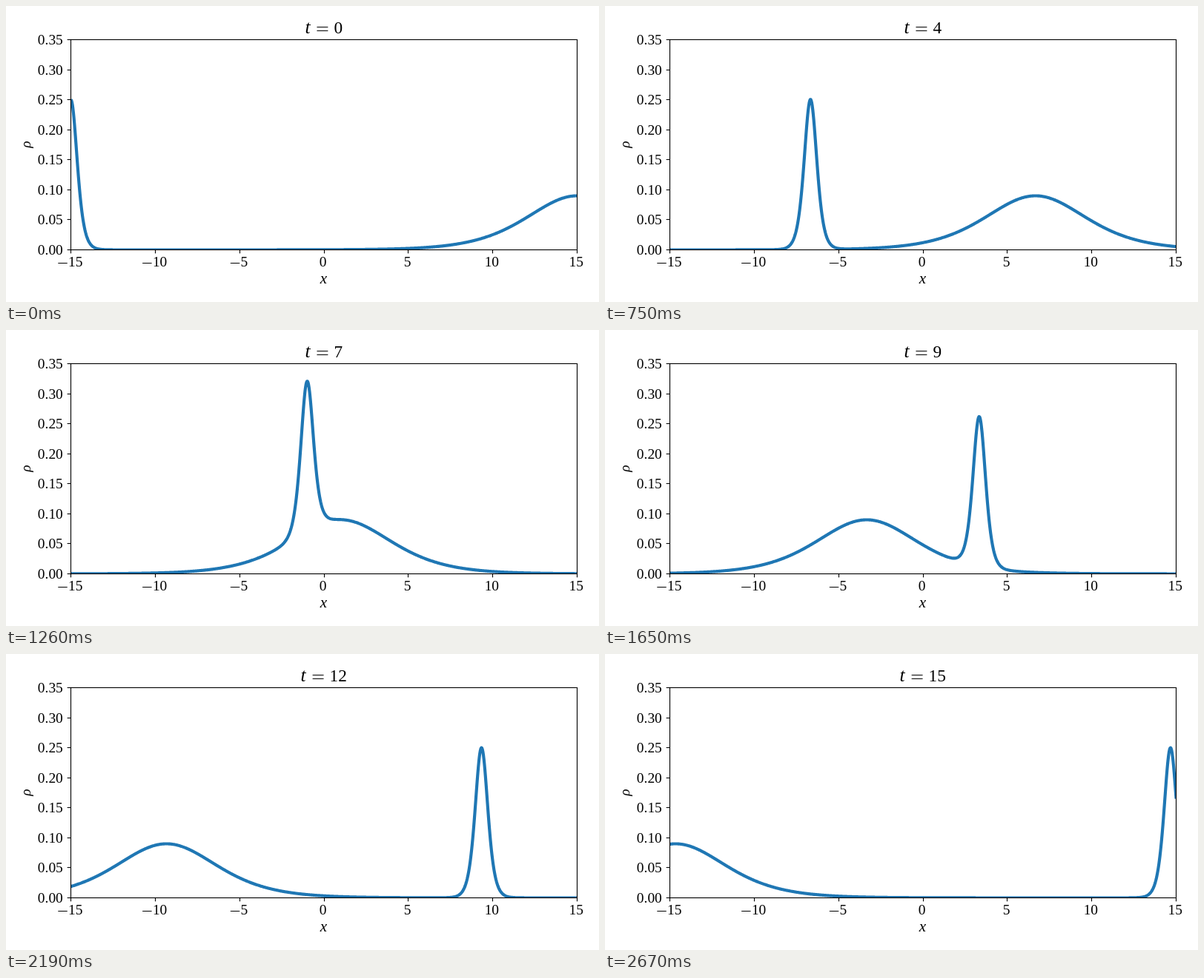
An HTML page with a canvas for the animation above (2700 ms loop, 800 by 400 pixels).

```html
<!DOCTYPE html>
<html lang="en">
<head>
<meta charset="utf-8">
<title>Two crossing pulses</title>
<style>
  html, body { margin: 0; width: 100%; height: 100%; overflow: hidden; background: #fff; }
  canvas { display: block; }
</style>
</head>
<body>
<canvas id="stage" width="800" height="400"></canvas>
<script>
const ctx = document.getElementById('stage').getContext('2d');
const SERIF = '"Liberation Serif", "Times New Roman", serif';
const STEP_MS = 30, STEPS = 90;
const LABEL = 19.4, TITLE = 23.3;
const box = { left: 87.5, right: 770.5, top: 45.5, bottom: 329.5 };
const xMin = -15, xMax = 15, yMax = 0.35;

const toX = x => box.left + (x - xMin) / (xMax - xMin) * (box.right - box.left);
const toY = y => box.bottom - y / yMax * (box.bottom - box.top);
const snap = v => Math.floor(v) + 0.5;
const pulse = (height, rate, d) => height / Math.cosh(rate * d) ** 2;

function roundHalfEven(v) {
  const low = Math.floor(v);
  return v - low === 0.5 ? low + low % 2 : Math.round(v);
}

function write(text, x, y, size, align = 'left', style = '') {
  ctx.font = `${style} ${size}px ${SERIF}`;
  ctx.textAlign = align;
  ctx.fillText(text, x, y);
}

function segment(x1, y1, x2, y2) {
  ctx.beginPath();
  ctx.moveTo(x1, y1);
  ctx.lineTo(x2, y2);
  ctx.stroke();
}

// Wide, thin bar used for the minus and equals signs.
function bar(x, y, size) {
  ctx.fillRect(x + 0.07 * size, y - 0.5, 0.64 * size, 1);
}

function drawCurve(shift) {
  ctx.save();
  ctx.beginPath();
  ctx.rect(box.left, box.top, box.right - box.left, box.bottom - box.top);
  ctx.clip();
  ctx.beginPath();
  const samples = 1000;
  for (let i = 0; i < samples; i++) {
    const x = xMin + (xMax - xMin) * i / (samples - 1);
    const rho = pulse(0.25, 2, x - xMin - shift) + pulse(0.09, 0.25, x - xMax + shift);
    ctx.lineTo(toX(x), toY(rho));
  }
  ctx.strokeStyle = '#1f77b4';
  ctx.lineWidth = 4.17;
  ctx.lineJoin = 'round';
  ctx.stroke();
  ctx.restore();
}

function drawAxes() {
  ctx.strokeStyle = ctx.fillStyle = '#000';
  ctx.lineWidth = 1.11;
  ctx.strokeRect(box.left, box.top, box.right - box.left, box.bottom - box.top);

  for (let v = xMin; v <= xMax; v += 5) {
    const x = toX(v), tick = snap(x);
    segment(tick, box.bottom, tick, box.bottom + 4.86);
    const digits = String(Math.abs(v));
    const minus = v < 0 ? 0.778 * LABEL : 0;
    const left = x - 1.3 - (minus + digits.length * LABEL / 2) / 2;
    if (minus) bar(left, 347.5, LABEL);
    write(digits, left + minus, 352, LABEL);
  }
  for (let i = 0; i <= 7; i++) {
    const y = toY(i * 0.05);
    segment(box.left - 4.86, snap(y), box.left, snap(y));
    write((i * 0.05).toFixed(2), 76.8, y + 6.5, LABEL, 'right');
  }

  write('x', 428.3, 375, 21, 'center', 'italic');
  ctx.save();
  ctx.translate(33.3, 187);
  ctx.rotate(-Math.PI / 2);
  write('ρ', 0, 0, LABEL, 'center', 'italic');
  ctx.restore();
}

function drawTitle(time) {
  const value = String(time);
  const left = 428.5 - (1.695 + value.length / 2) * TITLE / 2;
  write('t', left + 0.5, 37, 25.5, 'left', 'italic');
  bar(left + 0.639 * TITLE, 28.5, TITLE);
  bar(left + 0.639 * TITLE, 33.5, TITLE);
  write(value, left + 1.695 * TITLE, 37, TITLE);
}

function draw(now) {
  const step = Math.floor(now / STEP_MS) % STEPS;
  ctx.fillStyle = '#fff';
  ctx.fillRect(0, 0, 800, 400);
  drawCurve(step / 3);
  drawAxes();
  drawTitle(roundHalfEven(step / 6));
}

let start;
function loop(now) {
  start ??= now;
  draw(Math.max(0, now - start));
  requestAnimationFrame(loop);
}
draw(0);
requestAnimationFrame(loop);
</script>
</body>
</html>
```
